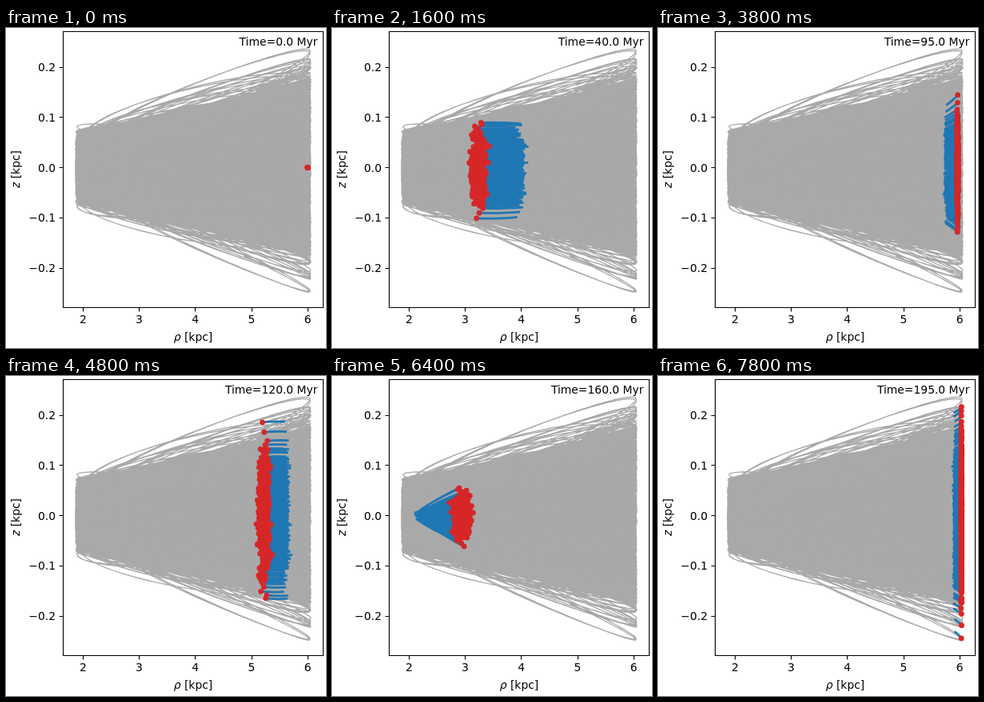
These frames come from a looping animation (400x400 px, 8000 ms). An HTML page:

```html
<!DOCTYPE html>
<html lang="en">
<head>
<meta charset="utf-8">
<title>Star cluster in the meridional plane</title>
<style>
  html, body { margin: 0; width: 100%; height: 100%; overflow: hidden; background: #fff; }
  svg { display: block; width: 100%; height: 100%; }
  text { font: 13.89px "DejaVu Sans", sans-serif; fill: #000; }
  .it { font-style: italic; }
  #orbits { fill: none; stroke: #a9a9a9; stroke-width: 1.3; stroke-linejoin: round; }
  #core { fill: #a9a9a9; stroke: #a9a9a9; stroke-width: 1.4; }
  #trails { fill: none; stroke: #1f77b4; stroke-width: 2.8; stroke-linecap: square; stroke-linejoin: round; }
  #stars { fill: #d62728; }
  #axes { fill: none; stroke: #000; stroke-width: 1.1; }
</style>
</head>
<body>
<svg viewBox="0 0 400 400">
  <path id="core" d="M90 130L379.5 67V282L90 219Q84 174.5 90 130Z"/>
  <path id="orbits"/>
  <path id="trails"/>
  <g id="stars"></g>
  <path id="axes"/>
  <g id="labels"></g>
  <text x="234" y="391" text-anchor="middle"><tspan class="it">ρ</tspan> [kpc]</text>
  <text transform="translate(17 176.5) rotate(-90)" text-anchor="middle"><tspan class="it">z</tspan> [kpc]</text>
  <text id="clock" x="389.5" y="22" text-anchor="end"></text>
</svg>
<script>
const LOOP = 8000, FRAME = 200, STEP = 5;    // each frame advances 5 Myr
const SPAN = 200, LONG = 800;                // Myr animated / Myr of orbit drawn
const K = 0.0169, L0 = 0.505, VR0 = 0.0206;  // pull K / r^0.6, in kpc and Myr
const $ = id => document.getElementById(id);
const X = rho => 96.3 + 70.2 * (rho - 2);
const Y = z => 174.5 - 628 * z;
const pt = (rho, z) => X(rho).toFixed(1) + ' ' + Y(z).toFixed(1);

let seed = 20;
function rand() {
  seed = seed + 0x6D2B79F5 | 0;
  let h = Math.imul(seed ^ seed >>> 15, 1 | seed);
  h = h + Math.imul(h ^ h >>> 7, 61 | h) ^ h;
  return ((h ^ h >>> 14) >>> 0) / 4294967296;
}
const gauss = () => Math.sqrt(-2 * Math.log(1 - rand())) * Math.cos(2 * Math.PI * rand());

// Common vertical oscillation, one knot every 10 Myr
const knots = [0, .14, .275, .37, .41, .31, .135, -.075, -.3, -.51, -.65, -.74, -.755,
  -.66, -.495, -.14, .25, .545, .797, .943, 1.02, .98];
function lift(t) {
  const i = Math.floor(t / 10), u = t / 10 - i;
  const a = i ? knots[i - 1] : -knots[1], b = knots[i], c = knots[i + 1], d = knots[i + 2];
  return b + u / 2 * (c - a + u * (2 * a - 5 * b + 4 * c - d + u * (3 * (b - c) + d - a)));
}

// Leapfrog in rho; returns [rho, angle] for every Myr
function orbit(vr, L, span) {
  const dt = 0.5, acc = r => L * L / r ** 3 - K / r ** 0.6;
  const out = [];
  let r = 6, angle = 0;
  for (let n = 0; n <= span / dt; n++) {
    if (n % 2 === 0) out.push([r, angle]);
    vr += acc(r) * dt / 2;
    r += vr * dt;
    vr += acc(r) * dt / 2;
    angle += dt / (r * r);
  }
  return out;
}

const heights = [-.246, -.22, -.197, -.186, .218, .21, .2, .188];
while (heights.length < 600) {
  const h = 0.085 * gauss();
  if (Math.abs(h) < 0.182) heights.push(h);
}

let lines = '';
const stars = heights.map(h => {
  const wide = Math.abs(h) > 0.155;
  const path = orbit(VR0 + 0.0015 * gauss(), L0 * (1 + 0.006 * gauss()), wide ? LONG : SPAN);
  if (wide) {
    const k = 0.475 * (1 + 0.02 * gauss());
    lines += 'M' + path.map(([r, a]) => pt(r, h * (r + 0.15) / 6.05 * Math.sin(k * a))).join('L');
  }
  const dot = document.createElementNS('http://www.w3.org/2000/svg', 'circle');
  dot.setAttribute('r', 3.4);
  $('stars').append(dot);
  return { h, path, dot };
});
$('orbits').setAttribute('d', lines);

function label(text, x, y, anchor) {
  const el = document.createElementNS('http://www.w3.org/2000/svg', 'text');
  el.setAttribute('x', x);
  el.setAttribute('y', y);
  el.setAttribute('text-anchor', anchor);
  el.textContent = text;
  $('labels').append(el);
}
const snap = v => Math.round(v - 0.3) + 0.5;
let axes = 'M71.5 4.5H396.5V349.5H71.5Z';
for (let r = 2; r <= 6; r++) {
  axes += `M${snap(X(r))} 349.5v5`;
  label(r, X(r).toFixed(1), 369, 'middle');
}
for (let i = -2; i <= 2; i++) {
  const y = Y(i / 10);
  axes += `M71.5 ${snap(y)}h-5`;
  label((i < 0 ? '\u2212' : '') + Math.abs(i / 10).toFixed(1), 62, Math.round(y + 5), 'end');
}
$('axes').setAttribute('d', axes);

let shown = -1;
function draw(ms) {
  const frame = Math.floor(ms % LOOP / FRAME);
  if (frame === shown) return;
  shown = frame;
  const t = frame * STEP, from = Math.max(0, t - STEP);
  let trails = '';
  for (const { h, path, dot } of stars) {
    if (t) {
      const pts = [];
      for (let s = from; s <= t; s++) pts.push(pt(path[s][0], h * lift(s)));
      trails += 'M' + pts.join('L');
    }
    dot.setAttribute('cx', X(path[t][0]).toFixed(2));
    dot.setAttribute('cy', Y(h * lift(t)).toFixed(2));
  }
  $('trails').setAttribute('d', trails);
  $('clock').textContent = `Time=${t.toFixed(1)} Myr`;
}

const start = performance.now();
function tick() {
  draw(performance.now() - start);
  requestAnimationFrame(tick);
}
tick();
</script>
</body>
</html>
```
